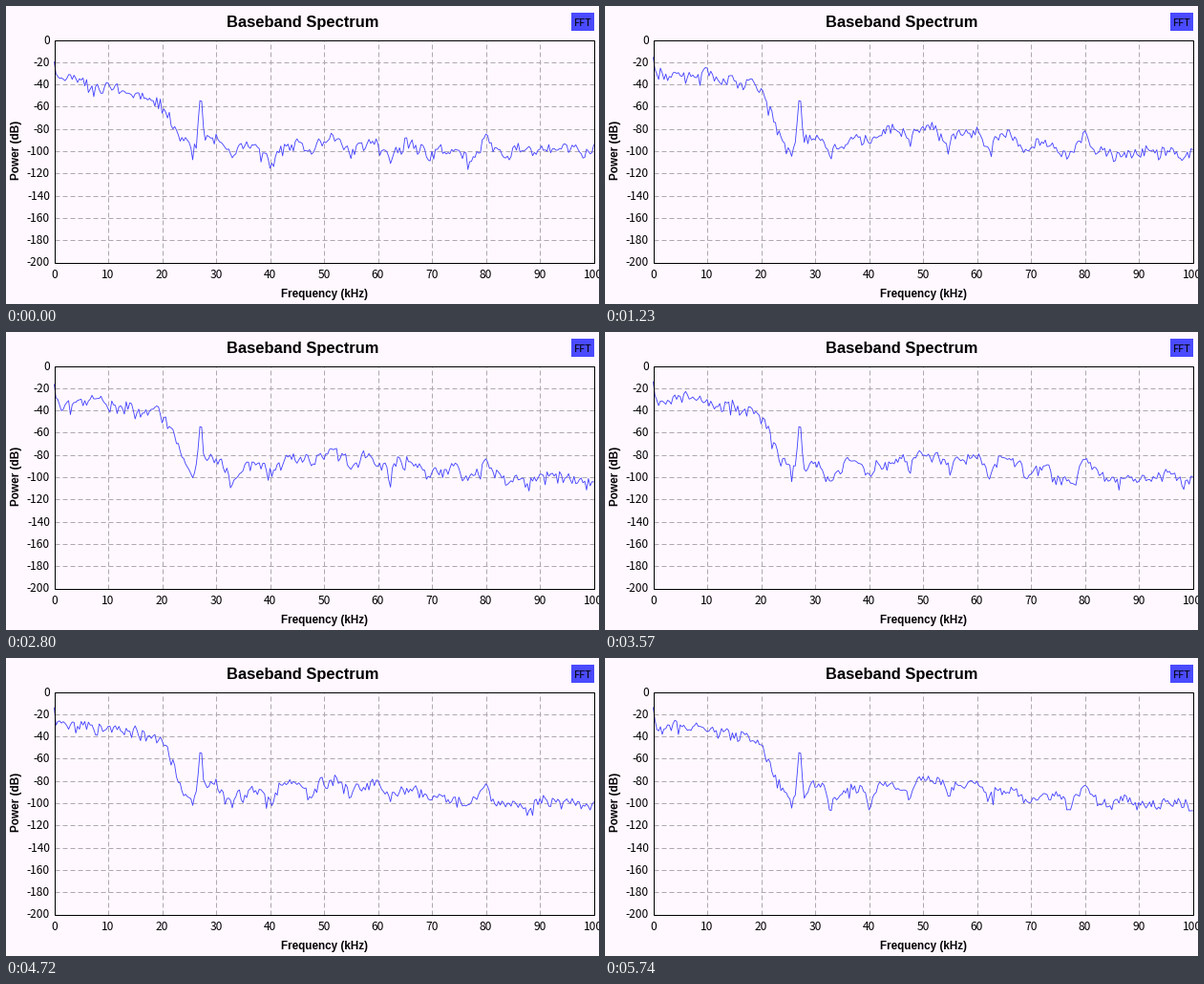
A matplotlib script for the animation above (5.83 s loop, 621x312 px).

```python
import numpy as np
import matplotlib.pyplot as plt
from matplotlib.animation import FuncAnimation
from matplotlib.patches import Rectangle

W, H, DPI = 621, 312, 100
PX = 72 / DPI
LOOP, STEP = 5830, 10
LEFT, RIGHT, TOP, BOTTOM = 50.5, 615.5, 35.5, 268.5
BG, BLUE, GRID = "#fff8ff", "#4040ff", "#b0a8b0"

# The analyser refreshes on a steady tick and skips a few of them
TICK = 77.5
SKIPPED = {1, 7, 13, 19, 23, 25, 30, 37, 43, 44, 50, 56, 62, 67, 73}
TIMES = np.array([max(0, n * TICK - 8) for n in range(75) if n not in SKIPPED])

freq = np.linspace(0, 100, 301)


def bump(center, width):
    return np.exp(-((freq - center) / width) ** 2)


def rise(center, width):
    return 1 / (1 + np.exp(-(freq - center) / width))


def envelope(quiet):
    """Sloping audio band that rolls off into lobes with regular nulls."""
    audio = -31 - 12 * (freq / 20) ** 2 - quiet * (4 + 0.6 * freq)
    audio += 16 * np.exp(-freq / 0.25)
    lobes = 20 * np.log10(np.abs(np.sin(np.pi * (freq - 33) / 7.3)) + 0.2)
    floor = -101 + 20 * (1 - 0.6 * quiet) * bump(52, 20) + 10 * bump(27, 5)
    floor += lobes * (1 - rise(80, 4)) + 14 * bump(80, 0.9)
    edge = rise(22.3, 0.9)
    return audio * (1 - edge) + floor * edge


def ripple(rng):
    """Noise in dB of an FFT: round tops and sharp dips."""
    z = rng.normal(size=(2, freq.size + 1))
    z = (z[:, 1:] + z[:, :-1]) / 2
    db = 20 * np.log10(np.hypot(*z) + 0.15)
    return 0.8 * np.clip(db - db.mean(), -14, 7)


def spectrum(k):
    rng = np.random.default_rng(100 + k)
    knots = np.arange(0, 101, 2)
    drift = np.interp(freq, knots, rng.normal(0, 2.5, knots.size))
    steady = 1 - 0.8 * bump(80, 0.8) - 0.7 * bump(0, 0.4)
    db = envelope(np.exp(-TIMES[k] / 300)) + steady * (drift + ripple(rng))
    carrier = -54 - 30 * np.abs((freq - 27.15) / 0.55) ** 3
    return np.clip(np.maximum(db, carrier), -122, -11)


def to_x(khz):
    return LEFT + khz * (RIGHT - LEFT) / 100


def to_y(db):
    return TOP - db * (BOTTOM - TOP) / 200


curves = [to_y(spectrum(k)) for k in range(len(TIMES))]

fig = plt.figure(figsize=(W / DPI, H / DPI), dpi=DPI, facecolor=BG)
ax = fig.add_axes([0, 0, 1, 1])
ax.set(xlim=(0, W), ylim=(H, 0))
ax.axis("off")


def text(x, y, s, size, ha="center", va="baseline",
         family="Noto Sans CJK JP", **kw):
    ax.text(x, y, s, size=size * PX, ha=ha, va=va, family=family,
            color="black", **kw)


def title(x, y, s, size, **kw):
    text(x, y, s, size, family="Liberation Sans", weight="bold", **kw)


def grid_line(xs, ys):
    ax.plot(xs, ys, color=GRID, lw=PX, dashes=(5, 3), snap=True)


for db in range(0, -201, -20):
    y = to_y(db)
    if -200 < db < 0:
        grid_line([LEFT, RIGHT], [y, y])
    text(46, y + 4, str(db), 12, ha="right")

for khz in range(0, 101, 10):
    x = to_x(khz)
    if 0 < khz < 100:
        grid_line([x, x], [BOTTOM, TOP])
    text(x, 285, str(khz), 12)

title(311, 22, "Baseband Spectrum", 16.5)
title(333, 305, "Frequency (kHz)", 11.6)
title(11, 150.5, "Power (dB)", 11.8, va="center", rotation=90)

ax.add_patch(Rectangle((592, 7), 24, 19, fc="#4a4aff", ec="none"))
text(604, 21, "FFT", 11)

line, = ax.plot(to_x(freq), curves[0], color=BLUE, lw=0.85 * PX,
                snap=False, zorder=3)
ax.add_patch(Rectangle((LEFT, TOP), RIGHT - LEFT, BOTTOM - TOP, fill=False,
                       ec="black", lw=PX, snap=True, zorder=4))


def update(i):
    k = np.searchsorted(TIMES, i * STEP, side="right") - 1
    line.set_ydata(curves[k])
    return line,


anim = FuncAnimation(fig, update, frames=LOOP // STEP, interval=STEP,
                     init_func=lambda: update(0), repeat=True, repeat_delay=0)
plt.show()
```
